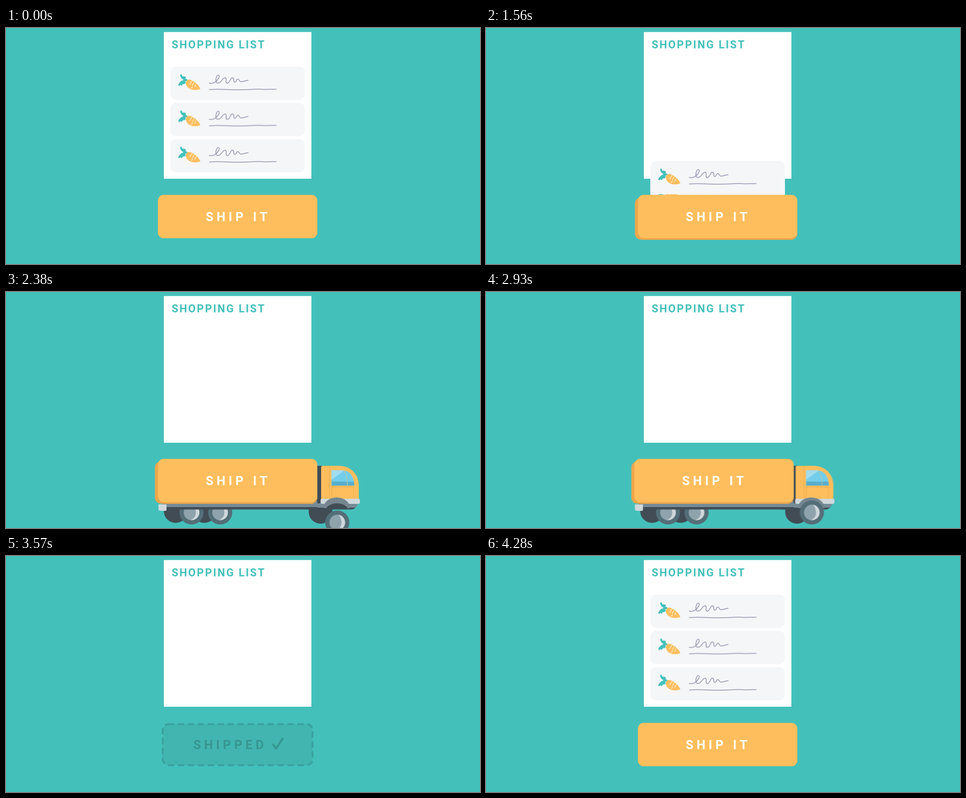
Animation of 880 by 440 pixels, one loop 5400 ms. Source, as an HTML page:

```html
<!DOCTYPE html>
<html lang="en">
<head>
<meta charset="utf-8">
<title>Ship it</title>
<style>
html, body { margin: 0; width: 100%; height: 100%; overflow: hidden; background: #44c0bb; }
svg { display: block; width: 880px; height: 440px; }
text { font-family: Roboto, Arial, sans-serif; font-weight: 700; }
.anim { animation: 5400ms linear infinite; }

.card { animation-name: card; }
@keyframes card {
  0%, 22.22% { transform: none; opacity: 1; animation-timing-function: ease-in; }
  30.37%, 60% { transform: translateY(var(--drop)); opacity: 1; }
  60.01%, 70% { transform: none; opacity: 0; animation-timing-function: ease-in-out; }
  79.2%, 100% { transform: none; opacity: 1; }
}

#cursor { animation-name: cursor; }
@keyframes cursor {
  0%, 10.9% { transform: translate(71px, 30px); opacity: 0; }
  10.92% { transform: translate(71px, 30px); opacity: .3; animation-timing-function: ease-out; }
  13.5%, 23.6% { transform: none; opacity: 1; }
  25.8%, 100% { transform: none; opacity: 0; }
}

#ripple { animation-name: ripple; transform-origin: 512px 360px; }
@keyframes ripple {
  0%, 21.46% { transform: none; opacity: 0; }
  21.47% { transform: none; opacity: 1; animation-timing-function: ease-out; }
  26%, 100% { transform: scale(3.5); opacity: 0; }
}

#side { animation-name: side; }
#base { animation-name: base; }
@keyframes side {
  0%, 22.2% { transform: none; }
  26%, 66.5% { transform: translate(-5.5px, 2.5px); }
  66.51%, 100% { transform: none; }
}
@keyframes base {
  0%, 22.2% { transform: none; }
  26%, 66.5% { transform: translateY(2.5px); }
  66.51%, 100% { transform: none; }
}

#truck { animation-name: drive; }
@keyframes drive {
  0%, 46.3% { transform: none; opacity: 1; animation-timing-function: ease-in-out; }
  52% { transform: translateX(-10px); opacity: 1; animation-timing-function: cubic-bezier(.3333, 0, .6667, 0); }
  66.11% { transform: translateX(792px); opacity: 1; }
  66.6%, 70% { transform: none; opacity: 0; animation-timing-function: ease-in-out; }
  79.2%, 100% { transform: none; opacity: 1; }
}

#gear { animation-name: gear; }
@keyframes gear {
  0%, 32.2% { visibility: hidden; }
  32.21%, 66.3% { visibility: visible; }
  66.31%, 100% { visibility: hidden; }
}
#under { animation-name: under; }
@keyframes under {
  0%, 32.2% { transform: translateY(-45px); animation-timing-function: ease-out; }
  36.1%, 100% { transform: none; }
}
#cab { animation-name: cab; }
@keyframes cab {
  0%, 34.4% { transform: translateX(-86px); animation-timing-function: ease-out; }
  40.7% { transform: translateX(1px); }
  44.07% { transform: none; }
  51%, 100% { transform: translateX(-3.5px); }
}
#rear { animation-name: rear; }
@keyframes rear {
  0%, 36.8% { transform: translateY(52px); }
  40% { transform: translateY(-3px); }
  41.8%, 100% { transform: none; }
}
#front { animation-name: front; }
@keyframes front {
  0%, 42.41% { transform: translateY(52px); }
  45.19% { transform: translateY(-3px); }
  46.7%, 100% { transform: none; }
}

#done { animation-name: done; }
@keyframes done {
  0%, 53.2% { opacity: 0; }
  53.21%, 70% { opacity: 1; animation-timing-function: ease-in-out; }
  79.2%, 100% { opacity: 0; }
}
</style>
</head>
<body>
<svg viewBox="0 0 880 440">
  <defs>
    <g id="item">
      <rect x="305" y="72" width="250" height="62" rx="11" fill="#f5f6f8"/>
      <g fill="none" stroke="#44c0bb" stroke-linecap="round" stroke-linejoin="round">
        <path d="M325 88 Q326 94 334 97 M321.5 106 Q325 99 335 97" stroke-width="3.4"/>
        <path d="M329 92.5 L331.5 93 M325.5 104.5 L326 104 M330 102 L331 101.5" stroke-width="5"/>
      </g>
      <path d="M334.5 100 C335 96 341 95 346 98 C352 101.500 358 107 361 113.500 C354 116.500 345 116.500 339 112 C335 108.500 333 104 334.500 100Z" fill="#ffbe5d"/>
      <path d="M341 105.500 L345.500 98.500 M346 107 L349 102 M350.500 110 L352.500 105.500 M344 112 L346.500 109.500" fill="none" stroke="#fff3df" stroke-width="1.200" stroke-linecap="round"/>
      <g fill="none" stroke="#9b9db8" stroke-width="1.500" stroke-linecap="round">
        <path d="M377.500 102.500 C384 105 391 100 395 93.500 C398 88 393 84.500 390.500 92 C388 100 391 105 397 101.500 C402 98 401 94 406 93 C412 91.500 405.500 103 411 103 C417 102 416 91 421 93 C425 95 421 101 425 101 C428 101 427 94.500 431 95.500 C435 97 432 100.500 437 100.200 C441 100 444 98 449.500 97.500"/>
        <path d="M377.500 114.800 C395 113.500 410 115 430 115.300 C450 115.800 460 113.300 475 114.200 C485 114.800 495 114 501.500 114.200"/>
      </g>
    </g>
    <g id="wheel">
      <circle r="22.500" fill="#546e78"/>
      <circle r="14.500" fill="#8fa3ad"/>
      <path d="M2 -14.400 A14.500 14.500 0 0 1 -2 14.400 Q8 10 8 0 Q7 -10 2 -14.400Z" fill="#cfd8dc"/>
    </g>
    <clipPath id="face"><rect x="282" y="311" width="296" height="81" rx="11"/></clipPath>
  </defs>

  <rect width="880" height="440" fill="#44c0bb"/>
  <rect x="293" y="7.500" width="274" height="273.500" fill="#fff"/>
  <text x="307.500" y="38.300" font-size="20" letter-spacing="2.200" fill="#44c0bb">SHOPPING LIST</text>

  <g transform="translate(0 135)"><use href="#item" class="anim card" style="--drop:109px;animation-delay:-40ms"/></g>
  <g transform="translate(0 67.500)"><use href="#item" class="anim card" style="--drop:175.500px;animation-delay:-20ms"/></g>
  <use href="#item" class="anim card" style="--drop:244px"/>

  <g id="done" class="anim">
    <rect x="291" y="313.500" width="278" height="76.500" rx="11" fill="#42b5b0" stroke="#3aa39f" stroke-width="4" stroke-dasharray="8.500 10" stroke-linecap="round"/>
    <text x="347.700" y="360" font-size="23" letter-spacing="6" fill="#389691">SHIPPED</text>
    <path d="M496 351.500 L501.500 359 L513.500 340.500" fill="none" stroke="#389691" stroke-width="4" stroke-linecap="round" stroke-linejoin="round"/>
  </g>

  <g id="truck" class="anim">
    <g id="gear" class="anim">
      <g id="under" class="anim" fill="#414c55">
        <circle cx="315" cy="408.500" r="22"/>
        <circle cx="368" cy="408.500" r="22"/>
        <circle cx="584" cy="410" r="22"/>
      </g>
      <g id="rear" class="anim">
        <use href="#wheel" x="344.500" y="411"/>
        <use href="#wheel" x="397.500" y="411"/>
      </g>
      <rect x="575" y="324" width="14" height="75" fill="#414c55"/>
      <g id="cab" class="anim">
        <path d="M580 394 H652 Q650 405.500 640 405.500 H560 V394Z" fill="#414c55"/>
        <path d="M580 394 H653 Q652 402 646 402 H560 V394Z" fill="#758b96"/>
        <path d="M588 324 H617 C641 324 655 340 655 362 V388 H585 V327 Q585 324 588 324Z" fill="#ffbe5d"/>
        <path d="M600.500 325 V386 M605 362.500 V386 M605 363.500 H645.500 V386" fill="none" stroke="#f0ad4f" stroke-width="1"/>
        <path d="M604.500 332.500 H624 C639 332.500 646.500 345 646.500 361 H604.500Z" fill="#73cdeb"/>
        <path d="M604.500 332.500 H624 Q626 332.500 628 333 L604.500 350Z" fill="#a3dcee"/>
        <path d="M604.500 353.500 H645.800 Q646.500 357 646.500 361 H604.500Z" fill="#57aecd"/>
        <path d="M628 333 Q634 343 634 361" fill="none" stroke="#b9c9a0" stroke-width="1.200"/>
        <rect x="584" y="385.500" width="73" height="9.500" rx="3" fill="#cfd8dc"/>
        <path d="M589.500 403 A24.500 20 0 0 1 638.500 403Z" fill="#758690"/>
        <path d="M594 405 A21 14 0 0 1 635 405Z" fill="#414c55"/>
        <g id="front" class="anim"><use href="#wheel" x="615" y="411"/></g>
      </g>
      <g>
        <rect x="290" y="390" width="288" height="12" fill="#758b96"/>
        <rect x="297" y="401" width="281" height="4.500" fill="#414c55"/>
        <path d="M283 396 H298 V406 Q298 408 296 408 H287 Q283 408 283 404Z" fill="#cfd8dc"/>
      </g>
    </g>
    <g fill="#eda64c">
      <rect id="side" class="anim" x="282" y="313.500" width="290" height="78.500" rx="11"/>
      <rect id="base" class="anim" x="282" y="313.500" width="296" height="78.500" rx="11"/>
    </g>
    <rect x="282" y="311" width="296" height="81" rx="11" fill="#ffbe5d"/>
    <g clip-path="url(#face)"><circle id="ripple" class="anim" cx="512" cy="360" r="10.500" fill="#f3b45a"/></g>
    <text x="370.800" y="360" font-size="23" letter-spacing="6" fill="#fff">SHIP IT</text>
  </g>

  <path id="cursor" class="anim" d="M512.500 375 V362.500 a2 2 0 0 1 4 0 V369 q1.800 -1.200 3 .4 q1.800 -.8 2.600 .7 q2.400 -.4 2.400 2.200 V376 q0 3 -2 5 V383.500 H512.500 V382 q-1.500 -2 -4 -6.500 q-1.500 -2.600 .3 -3 q1.800 -.3 3.700 2.500Z" fill="#fff" stroke="#111" stroke-width="1.200" stroke-linejoin="round"/>
</svg>
</body>
</html>
```
